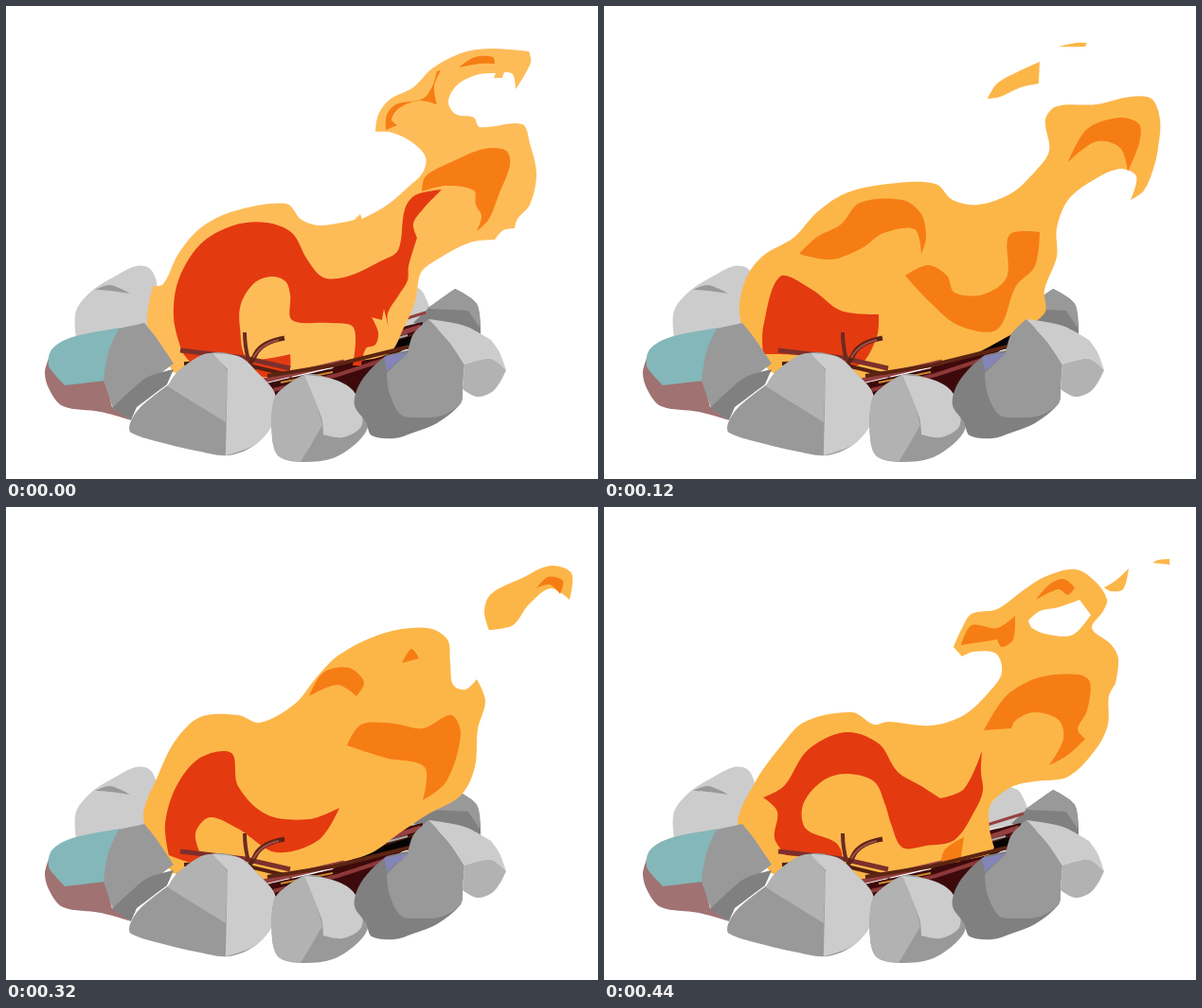
Recreate the animation shown at these times as an HTML page with a canvas. Size 625x500 px, loop 480 ms.

```html
<!DOCTYPE html>
<html lang="en">
<head>
<meta charset="utf-8">
<title>Campfire</title>
<style>
html, body { margin: 0; width: 100%; height: 100%; overflow: hidden; background: #fff; }
canvas { display: block; }
</style>
</head>
<body>
<canvas id="stage" width="625" height="500"></canvas>
<script>
const ctx = document.getElementById('stage').getContext('2d');
const LOOP = 480;
const RED = '#e43a10', ORANGE = '#f67d14', WHITE = '#fff';
const LIGHT = '#cccccc', PALE = '#b2b2b2', MID = '#999999', DARK = '#808080';
const BASE = ' 340,379 272,396 225,396';

// Points are "x,y"; a trailing "!" makes a sharp corner.
function parse(text) {
  return text.trim().split(/\s+/).map(s => {
    const [x, y] = s.replace('!', '').split(',').map(Number);
    return { x, y, sharp: s.endsWith('!') };
  });
}

function tangent(a, b, c) {
  if (b.sharp) return { x: 0, y: 0 };
  const d = Math.hypot(b.x - a.x, b.y - a.y) + Math.hypot(c.x - b.x, c.y - b.y);
  return { x: (c.x - a.x) / d, y: (c.y - a.y) / d };
}

function blob(text) {
  const pts = parse(text), n = pts.length, path = new Path2D();
  const tan = pts.map((p, i) => tangent(pts[(i + n - 1) % n], p, pts[(i + 1) % n]));
  path.moveTo(pts[0].x, pts[0].y);
  pts.forEach((p, i) => {
    const j = (i + 1) % n, q = pts[j], k = Math.hypot(q.x - p.x, q.y - p.y) / 3;
    path.bezierCurveTo(p.x + tan[i].x * k, p.y + tan[i].y * k,
      q.x - tan[j].x * k, q.y - tan[j].y * k, q.x, q.y);
  });
  path.closePath();
  return path;
}

const layer = items => items.map(([color, text]) => [color, blob(text)]);

function paint(items) {
  for (const [color, path] of items) {
    ctx.fillStyle = color;
    ctx.fill(path);
  }
}

function stick(color, width, d) {
  ctx.strokeStyle = color;
  ctx.lineWidth = width;
  ctx.stroke(new Path2D(d));
}

const backRocks = layer([
  [LIGHT, '74,350! 74,322 92,300 118,284 137,275 151,277 158,288 160,300! 158,340! 120,345!'],
  [MID, '94,300! 110,295 131,304! 109,301'],
  [LIGHT, '380,345! 405,318 424,295! 438,300 447,318! 440,335!'],
  [DARK, '430,335! 448,318 474,299! 497,315 501,348! 470,345!'],
  [MID, '444,320! 474,299! 497,315 500,340! 488,322!']
]);

const bed = layer([
  ['#3d0a0c', '270,400! 345,383! 390,346! 440,334! 440,352! 405,372! 372,414! 284,412!'],
  ['#080404', '352,374! 366,360! 428,347! 426,362! 380,372!']
]);

const frontRocks = layer([
  ['#a07272', '41,388 46,370! 62,400! 105,394! 112,424! 132,438! 100,429 60,423 46,406'],
  ['#84b7b9', '45,380 47,365 60,354 82,347 121,340! 113,362! 105,396! 62,401! 51,389'],
  [MID, '119,341! 146,335! 158,350 177,378! 165,387 145,401 113,425! 103,396! 108,366'],
  [DARK, '112,425! 130,408 150,392 177,384! 170,400! 138,424! 132,438!'],
  [MID, '172,400! 182,386 215,367 247,371 266,388 284,410 283,438 264,463 235,475 200,470 170,463 132,451 131,441 142,424'],
  [PALE, '171,402! 183,385 215,367 234,386! 232,440! 190,414!'],
  [LIGHT, '218,367! 247,371 266,388 284,410 283,438 264,463 232,475! 234,384!'],
  [MID, '283,416 295,402 318,389 342,394 364,405 378,428 382,445 370,462 345,478 311,482 288,476 281,456'],
  [PALE, '283,416 295,402 315,390! 327,418 334,443! 322,464 311,482! 288,476 281,456'],
  [LIGHT, '315,390! 344,394 366,406 376,430 374,446 355,456 335,453! 333,435'],
  [DARK, '368,422 372,402 385,384 402,369! 440,360! 482,405! 480,420 455,441 430,451 410,457 386,454 380,440'],
  [MID, '402,388! 424,367! 430,347 446,331! 468,355 484,379! 482,405! 480,420 460,433 436,435 417,432 405,410'],
  ['#8484b8', '399,371! 425,366! 402,386!'],
  [LIGHT, '446,331! 484,338 512,353! 521,366 528,385! 512,373 484,379! 468,355'],
  [PALE, '484,379! 512,373 528,385! 522,397 513,408 497,413 482,405!']
]);

const poses = [
  { until: 80, color: '#fdbc58',
    flame: ['176,387! 165,365 150,340 150,320 155,296! 166,294 182,262 205,235 240,217 296,209 312,226 332,232 368,226! 374,220! 376,225! 400,212 424,192 440,176 443,160 430,145 408,134 390,133! 393,115 405,99 430,86 450,66 480,50 510,45 552,48! 554,60 538,88! 535,72 526,70! 524,76! 515,76! 517,71! 500,72 478,82 467,100 474,114 494,118 500,128 545,125 553,145 560,178 553,210 540,225 537,235! 525,237 516,247! 490,250 455,268 438,282 432,312 420,340 403,368' + BASE],
    orange: ['401,131! 402,115 412,104 440,98 450,85 455,69! 459,68! 452,85 455,104! 436,100 415,108 407,120 413,126!',
      '478,65! 495,54 514,54 516,61! 500,61',
      '439,196! 443,180 470,165 505,151 528,153 532,168 520,200 510,225 497,238! 502,222 496,210 494,195 465,190'],
    red: ['186,366! 177,330 182,290 205,252 240,232 275,229 302,240 318,268 335,287 360,286 395,270 414,258 421,215 432,200 460,194! 440,215 430,230 434,245! 425,275 424,290 415,305 403,325 404,340! 399,320! 397,332! 386,329! 393,345 390,358 380,362 375,380! 366,380! 367,340 340,335 302,332 300,305 295,291 280,286 262,293 248,315 247,340 255,372 300,368! 297,390 250,390 200,380'] },
  { until: 120,
    flame: ['176,387! 160,365 146,340 147,315 157,278 178,271! 195,245 215,222 245,207 275,204! 285,197 325,198 348,215! 385,216 420,200 445,172 461,147 457,125 442,115 420,123 402,118 399,105 408,90 432,78 455,56 475,44 518,42! 519,46! 495,50 470,68 462,88 472,108 490,117! 494,116! 497,121 520,120 560,114 574,120 576,145 575,165! 571,175 570,198 555,213 515,220 475,232 457,250 453,285 456,318 425,350 385,372' + BASE,
      '530,42! 546,41 551,55 544,77! 545,60 540,48'],
    orange: ['405,110! 408,92 425,82 440,83 452,76 455,88 447,96 428,89 414,96',
      '450,181! 470,150 495,133 535,132 546,145 542,165 527,178 530,200 537,208! 515,209! 518,195 522,180 508,172 485,164 465,178'],
    red: ['172,370! 172,335! 182,315 190,275 215,256 245,235 275,218 310,219 323,235 318,268 330,290 360,303 405,308 420,290 417,250 424,220 433,200! 437,215! 452,217! 453,229 436,240 432,265 441,295 434,322! 428,309 412,311 398,325 396,338! 388,335! 390,358 384,371! 383,351 360,345 330,337 318,310 290,296 289,280 302,272! 300,261 275,264 266,273 251,285 250,305 257,320 256,345 270,355 268,375 230,370'] },
  { until: 200,
    flame: ['176,387! 155,360 143,325 150,288 168,264 200,245 225,218 255,198 300,188 350,188 368,205 395,210 430,198 455,175 470,153 466,120 478,106 520,104 555,96 578,98 587,120 585,150 580,172 570,195 556,205! 562,180 545,172 515,185 490,205 478,235 478,265 465,300 465,325 425,350 385,370' + BASE,
      '405,98! 415,82 440,68 460,59! 459,82! 440,86 418,96', '480,43! 498,39 510,39! 508,43!'],
    orange: ['490,165! 510,130 545,118 565,125 565,145 553,175! 545,150 520,143',
      '206,262! 225,244 250,231 270,208 315,205 335,220 340,245 335,262! 328,236 295,240 272,256 240,268',
      '318,285! 342,274 362,285 370,303 400,305 425,287 428,242 460,239! 455,275 435,296 415,342 375,338 345,314'],
    red: ['168,368! 168,340 186,286 220,300 250,322 290,326! 288,350 268,380 220,370'] },
  { until: 240,
    flame: ['176,387! 160,360 141,322 146,278 165,256 220,230 250,202 280,183 330,176 385,174 395,190 410,201 430,202! 450,190 469,183 472,168! 476,172! 481,150 478,112 488,100 520,100 545,88 565,81 580,82 588,98 598,112! 601,122 590,158! 592,162! 588,178 557,194! 555,188! 566,170 560,155! 565,140 548,137 528,157! 505,165 490,185 489,210 500,235 497,265 480,285 467,303 475,335! 440,350 385,368' + BASE,
      '416,75! 435,62 458,57! 459,72! 440,69', '487,39! 492,36 497,36! 496,39!'],
    orange: ['197,264! 210,240 230,234 255,225 268,195 295,187 325,192 338,205 349,212! 346,232 342,246! 338,260! 328,253! 335,240 338,222 322,208 298,217 290,213 274,222 270,248 250,265 230,262 212,248',
      '338,278! 345,264 375,258 377,275 372,290 395,301 420,297 438,280 440,250! 476,250! 470,287! 455,278! 435,285 425,310 408,342 380,340 358,320 357,290! 342,280!'],
    red: ['166,362! 165,350 185,300! 220,328 255,337! 262,328! 256,316! 303,333! 295,355! 268,388 235,368 190,372'] },
  { until: 320,
    flame: ['176,387! 155,345 144,310 155,290 175,250 200,233 240,234 265,222 295,180 330,165 365,153 405,148 435,158 440,185 450,210 463,220 480,207 480,185! 490,164! 494,185 504,205 490,230 477,255 480,280 488,312 470,335 440,350 425,358! 366,360 345,375' + BASE,
      '503,152! 497,130 486,108 490,92 525,85 550,71 585,68 602,82 602,110 585,132! 568,107! 545,124 530,143',
      '580,150! 588,146 595,148! 594,165 582,178 580,184! 576,183! 582,165'],
    orange: ['276,218! 292,183! 340,181! 342,188 330,200 345,212 348,230 340,235! 342,215 325,203 305,202', '246,246! 262,233! 258,250! 254,243', '403,186! 410,182 415,186!',
      '345,268! 362,247 392,250! 392,258 382,266 395,285 425,285 443,270 452,262! 445,247! 452,236! 468,250 462,290! 440,290 435,308 442,320 425,332 395,333 382,325! 410,315 414,300 390,290 378,268 360,266',
      '553,101! 565,85 590,86 592,95 582,120! 578,100 565,97', '495,108! 502,104! 499,98! 504,95! 504,105 508,114! 501,107'],
    red: ['166,318! 180,292 206,274! 207,300 230,325 265,335 308,332! 305,348! 337,345! 300,365 264,380! 262,360 235,350 210,345 195,322 185,310 175,318 172,330!'] },
  { until: 360,
    flame: ['176,387! 155,355 145,325 160,285 178,248 205,222 245,220 268,228 305,208 328,180 352,156 400,133 445,128 466,140 469,165 472,188 485,193 497,182! 506,205 498,235 495,275 480,305 445,325 415,345 385,366' + BASE,
      '510,130! 505,110 512,92 545,75 575,62 597,70 595,98! 575,86 552,103 535,125'],
    orange: ['320,200! 335,175 362,170 378,185 370,200! 350,188', '418,165! 428,150 436,160!', '360,252! 375,230 410,229 440,234 470,220 480,240 465,290 440,310! 442,275 400,265',
      '560,86! 572,74 588,78 585,92! 574,82'],
    red: ['172,368! 168,335 180,295 205,265 238,260 245,295 275,325 320,330 352,318! 330,352 285,365 245,340 215,328 200,345 205,376'] },
  { until: 440,
    flame: ['176,387! 155,358 146,325 158,290 168,272 172,250 200,226 238,205 248,215 258,235 295,235 340,223 358,216! 360,210! 378,205! 375,194 357,190 346,170 355,145 385,132 415,117 455,108 487,112 498,128 495,158! 503,165 512,195 511,255 502,285 470,318 440,320 410,325 385,325 386,345! 385,372' + BASE,
      '515,82! 540,75 560,62 580,56 593,68 592,79! 580,69 560,75 548,90 545,105 528,113 526,95'],
    gap: '442,152! 455,145 475,133! 479,145 470,160 455,154',
    orange: ['350,178! 357,158 375,153 385,163 402,168 395,178 375,170 360,180', '429,140! 438,123 446,118! 446,127 453,131! 445,134',
      '371,240! 375,222 405,208 425,213 445,219 470,206 487,210 489,245 480,285 467,297 448,300! 456,285 455,255! 440,245 415,248 410,254! 395,244'],
    red: ['182,370! 170,355 166,315 182,280 215,257 250,250 263,262 262,298 290,318 330,328 362,322 380,303! 378,325 358,360! 350,360 310,362 270,346! 272,325 255,310 230,312 210,320 206,330 213,342 205,362 212,380'] },
  { until: 480,
    flame: ['176,387! 160,362 141,335 160,290 185,255 212,227 262,217 285,230 300,227 345,231 380,220 407,195 420,175 414,155 390,153 378,158! 369,148! 378,128 388,113 415,108 440,90 465,74 498,66 520,80 531,98 527,110 515,128 535,145 543,160 540,187! 533,200 532,230 520,255 490,285 455,290 430,296 408,315 407,340 412,360! 405,368' + BASE,
      '528,85! 540,78 554,65! 548,87 535,89', '579,59! 585,56 597,55! 597,61!'],
    gap: '448,120! 460,110 480,106 502,98! 514,114! 495,135 470,135 452,128',
    orange: ['377,146! 388,125 415,128 434,115! 432,140 420,148 415,140!', '456,98! 470,82 485,76 497,85! 490,93 480,87',
      '401,236! 415,212 430,195 460,180 500,177 513,185 510,215 500,235 508,245! 490,262 470,273! 485,245 480,225 455,217 435,225 430,234!', '355,378! 360,362 380,349! 376,375!'],
    red: ['192,368! 180,350 183,322 168,307! 190,295 215,257 255,238 290,250 310,280 335,295 355,308! 380,298 399,258! 398,280 400,300 392,320 370,352 340,358 315,360 303,335 297,315 285,290 255,282 230,290 210,315 213,340 245,355 250,370'] }
];

for (const pose of poses) {
  const fill = pose.color || '#fcb648';
  pose.shapes = layer([
    ...pose.flame.map(s => [fill, s]),
    ...(pose.gap ? [[WHITE, pose.gap]] : []),
    ...pose.orange.map(s => [ORANGE, s]),
    ...pose.red.map(s => [RED, s])
  ]);
}

function backSticks() {
  paint(bed);
  stick('#944040', 3, 'M382 343L443 324');
  stick('#944040', 5, 'M360 364L438 339');
  stick('#4d1a14', 2, 'M358 370L440 344');
  stick('#a9a9a9', 2, 'M376 361L424 348');
}

function frontSticks() {
  stick('#7d2f2b', 5, 'M184 364L252 372L300 383');
  stick('#552010', 4, 'M188 378L240 376L302 391');
  stick('#6b2a22', 4, 'M252 345Q252 360 256 374');
  stick('#5c2415', 5, 'M294 351Q271 355 264 367Q259 378 248 389');
  stick('#a34d49', 2, 'M288 353Q269 357 261 372');
  stick('#944040', 5, 'M272 396L357 376');
  stick('#5c2412', 4, 'M276 391L345 380L426 360');
  stick('#c98a2c', 2, 'M290 398L345 387');
  stick('#8c3838', 4, 'M282 406L350 390L408 371');
}

function draw(now) {
  const time = now % LOOP;
  ctx.fillStyle = WHITE;
  ctx.fillRect(0, 0, 625, 500);
  paint(backRocks);
  backSticks();
  paint(poses.find(p => time < p.until).shapes);
  frontSticks();
  paint(frontRocks);
}

const start = performance.now();
function tick() {
  draw(performance.now() - start);
  requestAnimationFrame(tick);
}
tick();
</script>
</body>
</html>
```
